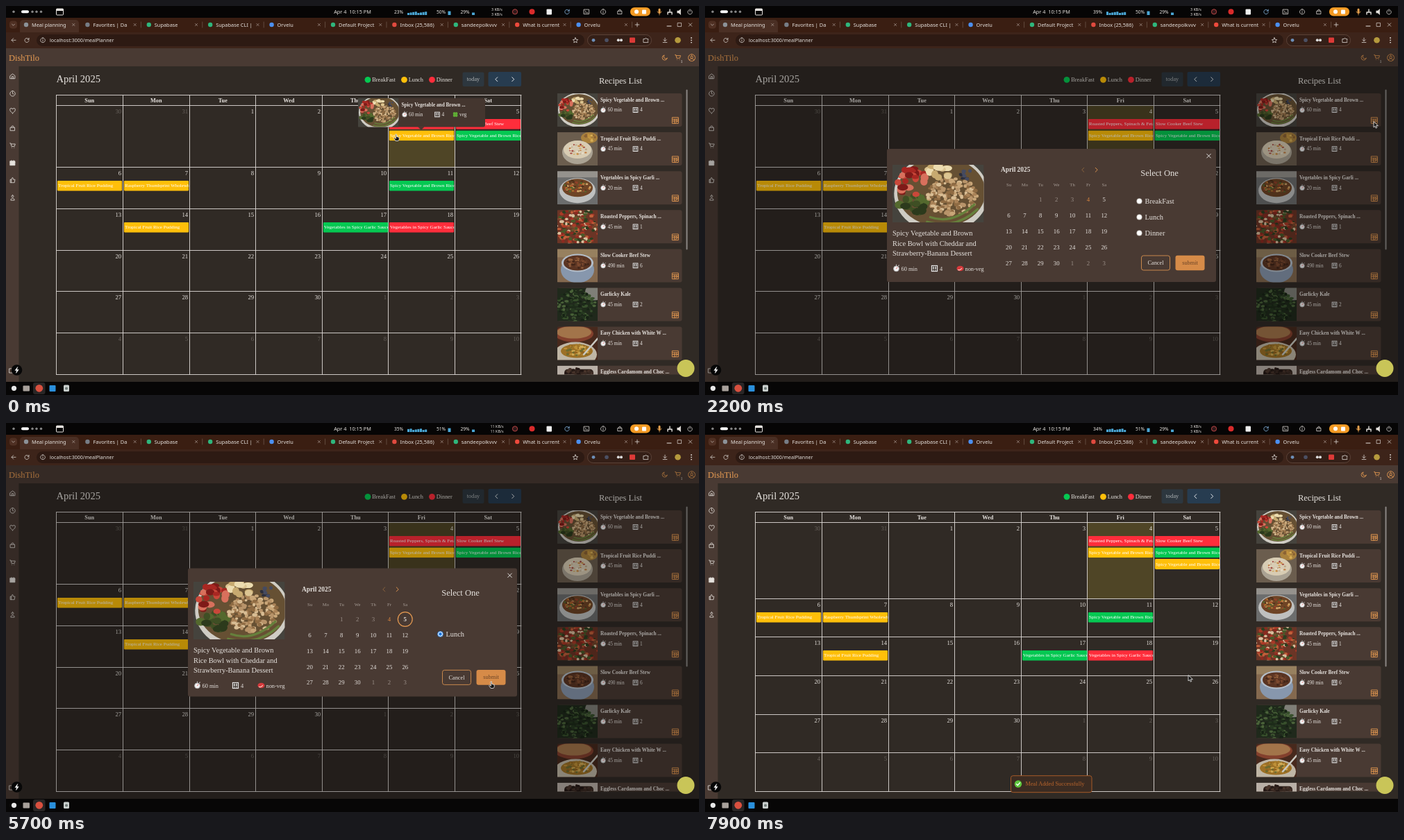
Animation of 998 by 561 pixels, one loop 8 s. Source, as an HTML page:

```html
<!DOCTYPE html>
<html lang="en">
<head>
<meta charset="utf-8">
<title>Meal planning</title>
<style>
  html, body { margin: 0; width: 100%; height: 100%; overflow: hidden; background: #302a25; }
  #stage { display: block; width: 100vw; height: 100vh; font-family: "Liberation Serif", Times, serif; }
  .ui { font-family: "Noto Sans", sans-serif; }
</style>
</head>
<body>
<svg id="stage" viewBox="0 0 998 561"><g id="page"></g><g id="browser"></g><g id="pointer"></g></svg>
<script>
const BROWN = '#493a33', INK = '#e6e2de', ORANGE = '#e79b52';
const GREEN = '#05c852', YELLOW = '#ffbf0a', RED = '#ff2d3b';
const CENTER = ' text-anchor="middle"', RIGHT = ' text-anchor="end"', BOLD = ' font-weight="bold"';

// Drawing helpers
const times = (n, fn) => Array.from({ length: n }, (_, i) => fn(i)).join('');
const text = (x, y, s, size = 8.32, fill = INK, extra = '') =>
  `<text x="${x}" y="${y}" font-size="${size}" fill="${fill}" ${extra}>${s}</text>`;
const ui = (x, y, s, size = 7.3, fill = INK, extra = '') => text(x, y, s, size, fill, 'class="ui" ' + extra);
const rect = (x, y, w, h, fill, r = 0, extra = '') =>
  `<rect x="${x}" y="${y}" width="${w}" height="${h}" rx="${r}" fill="${fill}" ${extra}/>`;
const dot = (x, y, r, fill, extra = '') => `<circle cx="${x}" cy="${y}" r="${r}" fill="${fill}" ${extra}/>`;
const oval = (x, y, rx, ry, fill) => `<ellipse cx="${x}" cy="${y}" rx="${rx}" ry="${ry}" fill="${fill}"/>`;
const line = (d, color = INK, width = 1, fill = 'none') =>
  `<path d="${d}" fill="${fill}" stroke="${color}" stroke-width="${width}" stroke-linejoin="round" stroke-linecap="round"/>`;
const at = (x, y, body, scale = 1) => `<g transform="translate(${x} ${y}) scale(${scale})">${body}</g>`;
const icon = (x, y, d, color = INK, scale = .4, fill = 'none') => at(x - 12 * scale, y - 12 * scale, line(d, color, 2.1, fill), scale);
const box = (x, y, w, h, body) => `<svg x="${x}" y="${y}" width="${w}" height="${h}">${body}</svg>`;

const ICON = {
  home: 'M3 10l9-7 9 7v11H3zM9 21v-8h6v8',
  clock: 'M12 2a10 10 0 1 0 .1 0zM12 6v6l4 2',
  heart: 'M12 21C5 15 2 12 2 8a5 5 0 0 1 10-2 5 5 0 0 1 10 2c0 4-3 7-10 13z',
  bag: 'M4 9h16v12H4zM8 9V7a4 4 0 0 1 8 0v2',
  cart: 'M2 3h3l3 12h11l3-9H6M9 20h.1M18 20h.1',
  calendar: 'M3 5h18v16H3zM3 10h18M8 2v4M16 2v4',
  thumb: 'M7 10v11H3V10zM7 10l4-8c2 0 3 1 3 3v4h7l-2 12H7',
  user: 'M12 3a4 4 0 1 0 .1 0zM5 21c0-9 14-9 14 0z',
  moon: 'M20 14A9 9 0 1 1 10 3a7 7 0 0 0 10 11z',
  planner: 'M2 2h20v20H2zM2 8h20M2 14h20M9 8v14M15 8v6M13 20l8-8',
  profile: 'M12 1a11 11 0 1 0 .1 0zM12 6a4 4 0 1 0 .1 0zM5 20c1-7 13-7 14 0',
  reload: 'M20 8a9 9 0 1 0 1 6M21 3v6h-6',
  info: 'M12 2a10 10 0 1 0 .1 0zM12 11v6M12 7h.1',
  square: 'M4 4h16v16H4z', cross: 'M5 5l14 14M19 5L5 19', plus: 'M12 4v16M4 12h16',
  back: 'M21 12H4M11 4l-8 8 8 8', left: 'M15 5l-7 7 7 7', right: 'M9 5l7 7-7 7',
  star: 'M12 2l3 7 7 1-5 5 1 7-6-4-6 4 1-7-5-5 7-1z',
  puzzle: 'M3 7h6a3 3 0 0 1 6 0h6v6a3 3 0 0 0 0 5v3H3z',
  download: 'M12 3v12M6 10l6 6 6-6M4 21h16', terminal: 'M2 3h20v18H2zM6 8l4 4-4 4M12 16h5',
  power: 'M8 5a9 9 0 1 0 8 0M12 2v9'
};
const watch = (x, y, s = 1) => at(x, y, line('M0-4.5v1M2.6-3.2l.6-.6', '#bbb') + dot(0, .3, 3.3, '#f4f4f4', 'stroke="#aaa" stroke-width=".8"') + line('M0 .3l1.2-1.6', '#d33', .6), s);
const people = (x, y, s = 1) => at(x, y, rect(-3.4, -3.4, 6.8, 6.8, '#4a413c', 0, 'stroke="#eee" stroke-width=".9"')
  + line('M-1.3-2v2.6M1.3-2v2.6M-1.3 2.6v.3M1.3 2.6v.3', '#eee', 1.1), s);

// Dishes: soft abstract pictures on a 58 x 48 field
const random = seed => () => (seed = seed * 16807 % 2147483647) / 2147483647;
function blobs(seed, n, colors, x, y, rx, ry, size) {
  const rnd = random(seed * 7919);
  return times(n, i => {
    const a = rnd() * 6.283, d = Math.sqrt(rnd());
    return oval((x + rx * d * Math.cos(a)).toFixed(1), (y + ry * d * Math.sin(a)).toFixed(1),
      (size * (.7 + rnd() * .6)).toFixed(1), (size * (.5 + rnd() * .5)).toFixed(1), colors[i % colors.length]);
  });
}
const join = (...parts) => parts.flat().join('');
const field = color => rect(0, 0, 58, 48, color);
const DISHES = [
  join(field('#45433d'), oval(31, 24, 30, 25, '#cfccc4'), oval(31, 23, 28, 22, '#665033'),
    blobs(3, 22, ['#3f4f24', '#54692e', '#2c3a1c'], 13, 31, 9, 6, 2.6),
    blobs(5, 190, ['#a98257', '#c9a678', '#8f6b43', '#b8946a', '#d8bd94'], 38, 26, 16, 12, 1.3),
    blobs(8, 22, ['#a82722', '#c9483a', '#7f1a18', '#d8705c'], 12, 16, 9, 10, 2.6),
    blobs(9, 12, ['#dcc592', '#ecdcb0', '#c7aa70'], 31, 10, 9, 4, 2.6),
    blobs(4, 10, ['#2b2d3b', '#454a60'], 46, 11, 4, 4, 1.4),
    line('M24 39q14 5 28-8M22 42q18 5 32-8', '#66803c', 1.5)),
  join(field('#6b5d4e'), oval(46, 8, 12, 8, '#a9813d'), blobs(2, 14, ['#d9b057', '#8a6134', '#c2933f'], 46, 8, 9, 5, 2),
    oval(29, 29, 22, 17, '#aaa293'), oval(29, 25, 20, 13, '#d8ccb3'),
    blobs(6, 30, ['#a34740', '#d3a85b', '#c27f45', '#e9dec8', '#bda98b'], 29, 25, 14, 8, 1.5)),
  join(field('#6c6d6d'), rect(0, 0, 58, 9, '#95928d'), oval(29, 28, 26, 18, '#bfc0bf'), oval(29, 24, 22, 13, '#6e4425'),
    blobs(7, 70, ['#b9702f', '#54662f', '#98412a', '#cfa468', '#4e301c', '#7d4a26'], 28, 23, 19, 10, 1.8)),
  join(field('#6b3526'), blobs(11, 190, ['#ab3a27', '#4a5a2a', '#c25f3a', '#d9bf9e', '#8c2a20', '#2c3f20', '#7a4a2c'], 29, 24, 33, 27, 2.6)),
  join(field('#84694f'), rect(0, 0, 58, 12, '#97805f'), oval(29, 30, 24, 19, '#8797ad'), oval(29, 20, 23, 13, '#b3bdc9'),
    oval(29, 20, 20, 11, '#5a3422'), blobs(12, 50, ['#7d4a2f', '#422619', '#94603c', '#653c28'], 29, 20, 16, 8, 2)),
  join(field('#20291c'), oval(54, 6, 14, 12, '#7f7f78'), blobs(13, 170, ['#263820', '#38502c', '#172215', '#4a6239', '#1d2c19'], 27, 26, 28, 24, 2.4)),
  join(field('#47291d'), oval(24, 10, 28, 12, '#83402d'), oval(24, 8, 25, 9, '#a2744a'),
    oval(26, 40, 31, 18, '#bfb6a5'), oval(28, 35, 23, 10, '#9c7026'),
    blobs(14, 60, ['#be9038', '#91621f', '#cfa953', '#6d6a2f', '#a87c2a'], 28, 34, 19, 8, 2.2), line('M38 40L58 17', '#c9c8c1', 2.4)),
  join(field('#b9b0a7'), rect(10, 5, 42, 30, '#33251f', 5), blobs(15, 40, ['#4b362c', '#241815', '#3a2a23'], 31, 10, 19, 6, 2.2))
];
const photo = (n, x, y, w, h) =>
  `<svg x="${x}" y="${y}" width="${w}" height="${h}" viewBox="0 0 58 48" preserveAspectRatio="xMidYMid slice">${DISHES[n]}</svg>`;

// Static page parts
const RECIPES = [
  ['Spicy Vegetable and Brown ...', 60, 4], ['Tropical Fruit Rice Puddi ...', 45, 4],
  ['Vegetables in Spicy Garli ...', 20, 4], ['Roasted Peppers, Spinach ...', 45, 1],
  ['Slow Cooker Beef Stew', 490, 6], ['Garlicky Kale', 45, 2],
  ['Easy Chicken with White W ...', 45, 4], ['Eggless Cardamom and Choc ...', 50, 8]
];
const recipeList = text(885, 111.5, 'Recipes List', 12.48, INK, CENTER)
  + box(0, 119, 998, 412.5, at(0, -119, RECIPES.map(([name, min, serves], i) => at(794, 126 + 56.1 * i,
      rect(0, 0, 179.5, 48, BROWN, 3) + photo(i, 0, 0, 58, 48)
      + text(62, 11.6, name, 7.28, INK, BOLD)
      + watch(66, 24) + text(72.5, 26.4, min + ' min', 7.28)
      + people(112.5, 24) + text(119, 26.4, serves, 7.28)
      + icon(170, 39, ICON.planner, ORANGE, .43))).join('')))
  + rect(979.5, 120.5, 2, 231, '#8a8683', 1);

const frame = rect(0, 61, 998, 481, '#302a25') + rect(0, 61, 998, 26, BROWN) + rect(0, 87, 18.5, 455, BROWN)
  + text(4, 79, 'DishTilo', 12.48, ORANGE)
  + icon(949, 74.5, ICON.moon, ORANGE) + icon(967.5, 74, ICON.cart, ORANGE) + text(973, 82, '1', 6, INK, CENTER) + icon(987.5, 74.5, ICON.profile, ORANGE, .45)
  + ['home', 'clock', 'heart', 'bag', 'cart', 'calendar', 'thumb', 'user']
    .map((name, i) => icon(9.5, 101.3 + 25 * i, ICON[name], INK, .38, name === 'calendar' ? INK : 'none')).join('')
  + icon(8, 526, ICON.square, INK, .38);

const toolbar = text(72.5, 110.2, 'April 2025', 14.55)
  + [['BreakFast', 521, GREEN], ['Lunch', 573.5, YELLOW], ['Dinner', 613.5, RED]]
    .map(([s, x, c]) => dot(x, 106.3, 4.4, c) + text(x + 6.2, 109.3, s)).join('')
  + rect(657.5, 95.5, 31, 20.5, '#2d373f', 2) + text(673, 108, 'today', 8.32, '#aeb2b4', CENTER)
  + rect(694.5, 95, 47.5, 21, '#273c50', 2) + icon(706.5, 105.7, ICON.left, '#fff', .42) + icon(730, 105.7, ICON.right, '#fff', .42);

const COL = 669 / 7, LONG = 'Spicy Vegetable and Brown Rice Bowl', FRUIT = 'Tropical Fruit Rice Pudding', GARLIC = 'Vegetables in Spicy Garlic Sauce';
const MEALS = [
  [5, 0, 0, 'Roasted Peppers, Spinach &amp; Feta', RED], [5, 0, 1, LONG, YELLOW],
  [6, 0, 0, 'Slow Cooker Beef Stew', RED], [6, 0, 1, LONG, GREEN],
  [0, 1, 0, FRUIT, YELLOW], [1, 1, 0, 'Raspberry Thumbprint Wholewheat', YELLOW], [5, 1, 0, LONG, GREEN],
  [1, 2, 0, FRUIT, YELLOW], [4, 2, 0, GARLIC, GREEN], [5, 2, 0, GARLIC, RED]
];
const snap = v => Math.floor(v) + .5;
function calendar(rowTwo, meals) {
  const left = c => snap(72.9 + COL * c), top = r => snap(r ? rowTwo + (531.5 - rowTwo) / 5 * (r - 1) : 143.5);
  const grid = times(8, c => `M${left(c)} 128.5V531.5`) + 'M72.5 128.5H742' + times(7, r => `M72.5 ${top(r)}H742`);
  return rect(left(5), 143.5, COL, rowTwo - 143.5, '#4f4526')
    + ['Sun', 'Mon', 'Tue', 'Wed', 'Thu', 'Fri', 'Sat'].map((s, c) => text(left(c) + COL / 2, 138.8, s, 8.32, INK, BOLD + CENTER)).join('')
    + times(42, i => {
      const day = i - 1, outside = day < 1 || day > 30;
      return text(left(i % 7 + 1) - 2.4, top(Math.floor(i / 7)) + 11.6, day < 1 ? day + 31 : day > 30 ? day - 30 : day,
        8.7, outside ? '#68625d' : INK, RIGHT);
    })
    + line(grid, '#dedad6', .9)
    + meals.map(([c, r, slot, name, color]) => box(left(c) + 1.2, top(r) + 19.4 + 16.6 * slot, 93.6, 14.8,
      rect(0, 0, 93.6, 14.8, color, 1.8) + text(1.4, 9.6, name, 7.07, '#fff'))).join('');
}
const before = calendar(232.5, MEALS);
const after = calendar(253, [...MEALS, [6, 0, 2, LONG, YELLOW]]);

const tooltip = rect(507, 133, 183, 41.5, '#44362f', 3) + line('M594 174.5h8l-4 4z', '#44362f', .5, '#44362f') + photo(0, 507, 133, 58.5, 41.5)
  + text(569.5, 144.6, RECIPES[0][0], 7.28, INK, BOLD) + watch(574, 156.5) + text(580, 159, '60 min', 7.28)
  + people(621, 156.5) + text(627.5, 159, '4', 7.28)
  + times(4, i => dot(645.6 + 3 * (i % 2), 155 + 3 * (i >> 1), 1.9, '#5fae35')) + text(653, 159, 'veg', 7.28);

const toast = rect(440.5, 508.7, 116.5, 24, '#3c2c22', 3, 'stroke="#a55a28"')
  + dot(451, 520.5, 5.2, '#5fc63c') + line('M448.6 520.7l1.7 1.8 3.2-3.7', '#fff', 1.3)
  + text(461.5, 523.3, 'Meal Added Successfully', 8.32, '#b8642c');

const badges = dot(15.5, 525, 7.8, '#070707') + line('M16.6 520.8l-3.6 4.8h2.4l-.8 3.8 3.6-4.9h-2.4z', '#fff', .5, '#fff') + dot(979, 522.5, 12.5, '#c9c558');

function modal(t) {
  const picked = t >= 4500 ? 5 : t >= 3100 ? 4 : 0;
  const y0 = picked ? 209.6 : 206, y1 = 604 - y0, busy = t >= 6200;
  const options = !picked ? ['BreakFast', 'Lunch', 'Dinner'] : [picked === 4 ? 'BreakFast' : 'Lunch'];
  const x = i => 437.5 + 22.88 * i;
  const days = times(35, i => {
    const n = i - 1, cx = x(i % 7), cy = y0 + 73.4 + 22.85 * Math.floor(i / 7);
    if (n < 1) return '';
    const on = n === picked, color = n === 4 ? '#d9853f' : n < 4 || n > 30 ? '#9c918a' : INK;
    return (on ? dot(cx, cy, 10.4, 'none', `stroke="${ORANGE}" stroke-width="1.2"`) : '')
      + text(cx, cy + 3, n > 30 ? n - 30 : n, 8.8, color, CENTER + (on ? BOLD : ''));
  });
  const radios = options.map((name, i) => {
    const cy = 304.4 + 23 * (i - (options.length > 1)), on = t >= 4900;
    return dot(625.5, cy, 3.9, '#fff', `stroke="${on ? '#1675e0' : '#8a8079'}" stroke-width="${on ? .9 : .5}"`)
      + (on ? dot(625.5, cy, 2.3, '#1675e0') : '') + text(633.5, cy + 3.4, name, 10.4);
  }).join('');
  const by = y1 - 38.3, spin = t * .36 % 360;
  return rect(262, y0, 474, y1 - y0, BROWN, 3) + photo(0, 270, 229, 131.5, 83)
    + ['Spicy Vegetable and Brown', 'Rice Bowl with Cheddar and', 'Strawberry-Banana Dessert'].map((s, i) => text(270, 331.3 + 14.55 * i, s, 10.4)).join('')
    + watch(275.5, 378.5, 1.2) + text(282.5, 381.5, '60 min') + people(330.5, 378.5, 1.2) + text(338, 381.5, '4')
    + oval(367.5, 378.5, 5, 3.8, '#d7393c') + line('M364.5 380.5q3 1 5-2', '#f6c9bd', 1.3) + text(374.5, 381.5, 'non-veg')
    + text(426, y0 + 33, 'April 2025', 9.36, INK, BOLD)
    + icon(544.5, y0 + 30.3, ICON.left, '#92683f', .43) + icon(563.5, y0 + 30.3, ICON.right, ORANGE, .43)
    + times(7, i => text(x(i), y0 + 54, ['Su', 'Mo', 'Tu', 'We', 'Th', 'Fr', 'Sa'][i], 6.7, '#a79d96', CENTER)) + days
    + text(654.5, y0 + 39.3, 'Select One', 12.48, INK, CENTER) + radios
    + rect(628.5, by + .3, 41, 21, 'none', 3, `stroke="${ORANGE}" stroke-width=".8"`) + text(649, by + 13.4, 'Cancel', 8.32, INK, CENTER)
    + rect(677.5, by, 42, 21.6, busy ? '#cb6515' : '#d68b48', 3)
    + (busy ? `<g transform="translate(698.5 366.7) rotate(${spin})">${dot(0, 0, 5.2, 'none', 'stroke="#8a5f3e" stroke-width="1.6"')}${line('M0-5.2A5.2 5.2 0 0 1 5.2 0', '#3b2c25', 1.6)}</g>`
      : text(698.5, by + 13.2, 'submit', 8.32, '#6a4327', CENTER))
    + icon(725.5, y0 + 10.2, ICON.cross, '#fff', .4);
}

// Desktop and browser chrome
const TABS = [['Meal planning', '#8c9298'], ['Favorites | Da', '#777d86'], ['Supabase', '#2fb67c'], ['Supabase CLI |', '#2fb67c'], ['Orvelu', '#4b8ff0'],
  ['Default Project', '#2fb67c'], ['Inbox (25,586)', '#e04a3f'], ['sandeepolkvvv', '#2fb67c'], ['What is current', '#ee4a3c'], ['Orvelu', '#4b8ff0']];
const chrome = rect(0, 0, 998, 17, '#060505') + rect(0, 17, 998, 21.5, '#3a1e12') + rect(0, 38, 998, 23, '#3d241a')
  + rect(0, 542, 998, 19, '#070606')
  + [11, 38, 44, 50.5].map(x => dot(x, 8.3, 1.7, '#888')).join('') + rect(22, 6.3, 11, 4, '#fff', 2)
  + rect(72.5, 4, 10, 9, 'none', 1, `stroke="${INK}"`) + rect(72.5, 4, 10, 3, INK)
  + ui(499, 10.8, 'Apr 4&#160; 10:15 PM', 7.3, INK, CENTER)
  + dot(733, 8.3, 3.6, '#33191a', 'stroke="#b94545" stroke-width="1"') + dot(757.5, 8.3, 4, '#d92b2b') + rect(778.5, 4.5, 7.5, 8, '#eee', 1)
  + icon(808, 8.3, ICON.reload, '#8fc1f0', .36) + icon(836, 8.3, ICON.terminal, INK, .36) + icon(860, 8.3, ICON.info, INK, .36)
  + icon(884, 8.3, ICON.bag, INK, .36) + rect(899, 2, 29, 12.5, '#f39a24', 6) + dot(908, 8.3, 3, '#fff') + rect(916, 5.5, 6, 6, '#fff', 1)
  + rect(939.5, 3.5, 3, 7, '#e5a04d', 1.5) + line('M938 8q3 6 6 0M941 11v2', '#e5a04d', .8)
  + line('M956 5v3M953 12V9h6v3', INK, 1.4) + line('M967 7h2l2.5-2.5v8L969 10h-2z', INK, .6, INK) + icon(985, 8.3, ICON.power, INK, .36)
  + rect(5, 21.5, 11, 11, '#4f3023', 4) + icon(10.5, 27, 'M5 9l7 7 7-7', INK, .28)
  + rect(20, 20, 85, 22, '#4a2f24', 5) + rect(0, 38, 998, 4, '#3d241a')
  + TABS.map(([name, color], i) => at(88.4 * i, 0, dot(29, 27, 3.2, color) + box(37, 18, 53, 18, ui(0, 11.8, name, 7.4))
      + icon(97.3, 27, ICON.cross, '#d0c4bd', .24) + (i ? line('M106 23v8', '#755f54', .7) : ''))).join('')
  + icon(909, 27, ICON.plus, INK, .36) + line('M952 29h6', INK) + icon(970, 27, ICON.square, INK, .32) + icon(985.5, 27, ICON.cross, INK, .32)
  + icon(11, 49.3, ICON.back, INK, .34) + icon(30, 49.3, ICON.reload, INK, .34)
  + rect(44, 41, 789, 17, '#2d1a13', 8.5) + icon(53, 49.3, ICON.info, INK, .34) + ui(63, 52, 'localhost:3000/mealPlanner', 7.05)
  + icon(820, 49.3, ICON.star, INK, .36) + rect(837.5, 41.5, 92, 16, '#341f17', 8, 'stroke="#6a5145" stroke-width=".7"')
  + dot(846, 49.3, 2.4, '#6d8fb8') + dot(865, 49.3, 2.8, '#4b5063') + dot(881.8, 49.3, 2, '#ddd') + dot(886, 49.3, 2, '#ddd') + rect(898, 45.5, 8, 7.5, '#dd3a37', 1)
  + icon(921.5, 49.3, ICON.puzzle, INK, .36) + icon(949, 49.3, ICON.download, INK, .36)
  + dot(967.5, 49.3, 4.3, '#b59a3d') + [46, 49.3, 52.6].map(y => dot(987, y, .9, INK)).join('')
  + dot(11.5, 551.3, 3.6, '#e7e7e7') + rect(24.5, 547.5, 9.5, 8, '#a7a09a', 1) + rect(39, 543, 17.5, 17, '#292626', 3)
  + dot(47.8, 551.3, 5.4, '#d8503f') + rect(62.5, 547, 9, 9, '#2a8fdb', 1) + rect(83, 546.5, 8, 9.5, '#c9cfcd', 1.5) + dot(87, 551.5, 2, '#6f7a77');

function meters(t) {
  const [cpu, mem, kb] = t < 900 ? [23, 50, 3] : t < 3500 ? [39, 50, 3] : t < 6200 ? [35, 51, 11] : [34, 51, 3];
  const phase = Math.floor((t + 1700) / 2600);
  return ui(565.5, 10.6, cpu + '%', 6.7, INK, CENTER) + ui(626.5, 10.6, mem + '%', 6.7, INK, CENTER) + ui(661, 10.6, '29%', 6.7, INK, CENTER)
    + times(8, i => { const h = 3 + (i * 5 + phase * 3) % 4 * .6; return rect(578 + 3.6 * i, 13 - h, 3, h, '#4aa7d6'); })
    + rect(636.5, 7.5, 4, 5.5, '#4aa7d6') + rect(671, 9.5, 4, 3.5, '#4aa7d6')
    + [7, 13.8].map(y => ui(707, y, kb + ' KB/s', 5.4, INK, CENTER)).join('');
}

// Pointer: time, x, y
const PATH = [[0, 562, 185], [300, 562, 185], [1100, 947, 164], [1400, 947, 164], [1800, 963, 167], [2200, 963, 167], [2900, 552, 280],
  [3700, 552, 280], [4000, 571, 295], [4300, 571, 295], [4400, 574, 284], [4500, 574, 284], [4900, 625, 303], [5200, 625, 303],
  [5700, 699, 373], [6100, 699, 373], [6600, 696, 364], [8000, 696, 364]];
const HANDS = [[0, 400], [1000, 2100], [2800, 3700], [4400, 4600], [5600, 6200]];
function pointer(t) {
  const i = PATH.findIndex(p => p[0] > t), [ta, xa, ya] = PATH[i - 1], [tb, xb, yb] = PATH[i];
  const u = (t - ta) / (tb - ta), k = u * u * (3 - 2 * u), x = xa + (xb - xa) * k, y = ya + (yb - ya) * k;
  if (t >= 6200 && t < 7700) return at(x, y + 1, dot(0, 0, 3.7, '#fff') + dot(0, 0, 3.1, '#fff', 'stroke="#181818" stroke-width="1.5"') + line('M-2-2L2 2', '#181818', 1.3));
  const hand = HANDS.some(([a, b]) => t >= a && t < b);
  return at(x, y, line(hand ? 'M-.8 0h1.3v3.4l3.7 1v3.2L3 9.5h-4L-3.4 5.7l.8-.7 1.8 1z' : 'M0 0v8l1.9-1.7 1.3 2.9 1.5-.7-1.3-2.8h2.6z', '#f2f2f2', .8, '#161616'));
}

const [page, browser, cursor] = ['page', 'browser', 'pointer'].map(id => document.getElementById(id));
const OPEN = 2100, CLOSE = 7700;
let shown = -1;
function draw(now) {
  const t = Math.floor(now % 8000 / 100) * 100;
  if (t !== shown) {
    shown = t;
    const open = t >= OPEN && t < CLOSE, done = t >= CLOSE, fade = Math.min(1, (t - OPEN + 100) / 200);
    page.innerHTML = frame + toolbar + (done ? after : before) + recipeList + (t < 400 ? tooltip : '')
      + (open ? rect(0, 61, 998, 481, '#000', 0, `opacity="${.28 * fade}"`) + `<g opacity="${fade}">${modal(t)}</g>` : '')
      + (done ? toast : '') + badges;
    browser.innerHTML = chrome + meters(t);
    cursor.innerHTML = pointer(t);
  }
  requestAnimationFrame(draw);
}
draw(performance.now());
</script>
</body>
</html>
```
